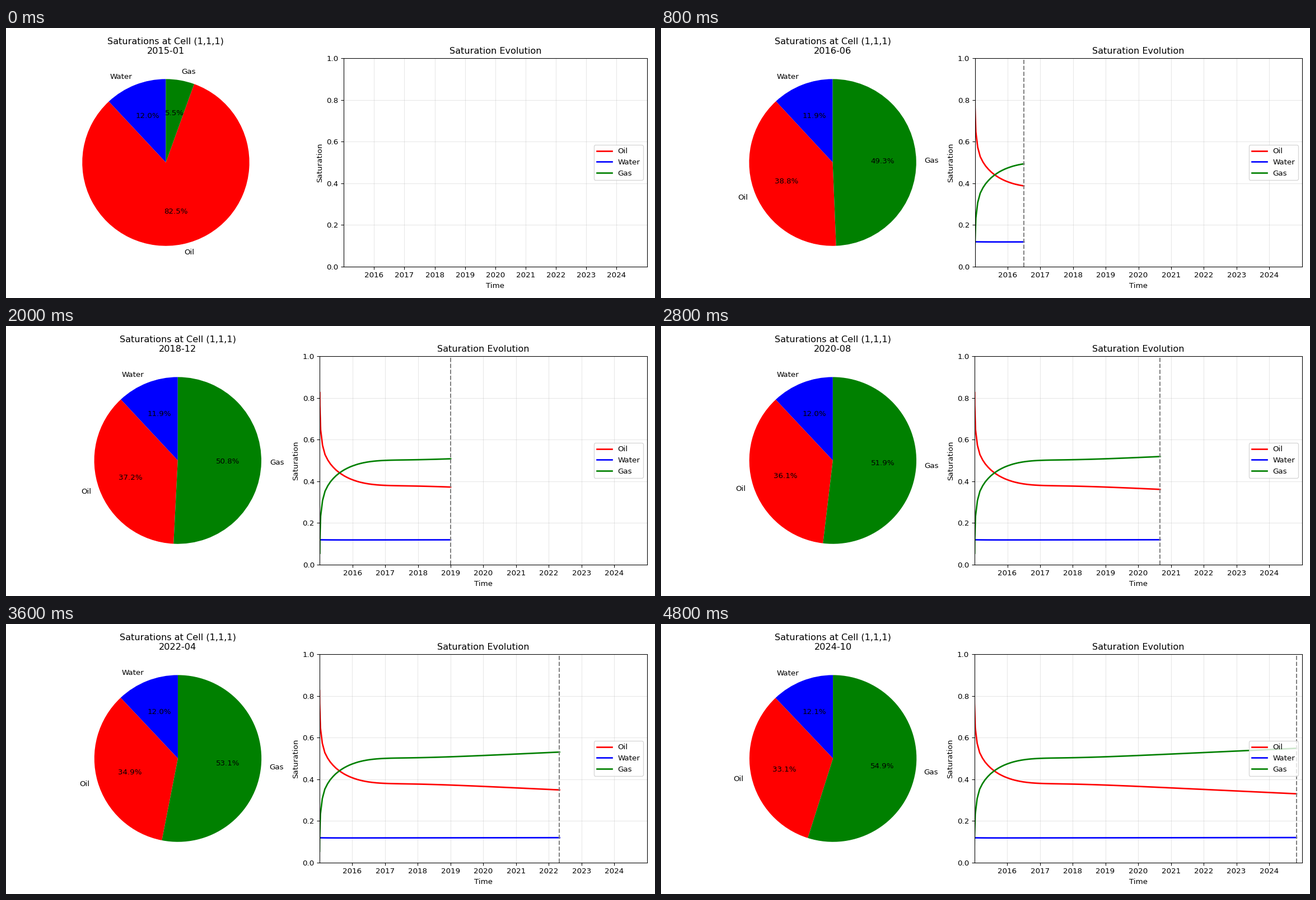
A matplotlib script that plays this animation: 1159x483 px, repeating every 5000 ms.

```python
import numpy as np
import matplotlib.pyplot as plt
from matplotlib.animation import FuncAnimation

W, H = 1159, 483
DPI = W / 12
FRAMES, INTERVAL, STRIDE = 25, 200, 5
LAST_MONTH = 118
TOP, BOTTOM, PIE_LEFT, RIGHT = 54.05, 427.05, 14.6, 1144.6
COLORS = {"Oil": "red", "Water": "blue", "Gas": "green"}
PIE_ORDER = ["Water", "Oil", "Gas"]
START = np.datetime64("2015-01")


def days_at(month):
    """Days from the start to the first of the given month."""
    return ((START + month).astype("M8[D]") - START.astype("M8[D]")).astype(float)


def gas_at(m):
    """A fast and a slow rise to a plateau that later turns into a steady climb."""
    climb = 0.0006 * 8.5 * np.log1p(np.exp((m - 38) / 8.5))
    fast = 0.2622 * np.exp(-2 * m ** 0.6)
    slow = 0.1835 * np.exp(-m / 6.6 - (m / 22) ** 4)
    return 0.5007 + climb - fast - slow


def water_at(m):
    return 0.1186 + 0.000018 * m + 0.001 * np.exp(-m / 4)


# Report steps: two short ones, then one per month
whole = np.arange(1, LAST_MONTH + 1)
months = np.concatenate([[0, 1 / 30, 1 / 3], whole])
days = np.concatenate([[0, 1, 10], days_at(whole)])
gas, water = gas_at(months), water_at(months)
series = {"Oil": 1 - water - gas, "Water": water, "Gas": gas}

fig = plt.figure(figsize=((W + 0.001) / DPI, (H + 0.001) / DPI), dpi=DPI, facecolor="white")
pie_ax = fig.add_axes([0.01, 0.1, 0.4, 0.8])
ax = fig.add_axes([0.5, 0.1, 0.4, 0.8])

lines = {name: ax.plot([], [], color=color, lw=2, label=name)[0]
         for name, color in COLORS.items()}
now = ax.axvline(0, color="gray", ls="--", lw=1.5)
years = range(2016, 2025)
ax.set_xticks([days_at((y - 2015) * 12) for y in years], [str(y) for y in years])
ax.set_xlim(0, 3652.5)
ax.set_ylim(0, 1)
ax.set_xlabel("Time")
ax.set_ylabel("Saturation")
ax.set_title("Saturation Evolution")
ax.grid(True, alpha=0.3)
ax.legend(loc="center right")


def place(axes, left, width):
    axes.set_position([left / W, 1 - BOTTOM / H, width / W, (BOTTOM - TOP) / H])


def date_label(step):
    # Later reports fall just before the month's turn
    month = int(months[step])
    return str(START + (month - (month > 8)))


def update(i):
    step = i * STRIDE

    # The layout settles quickly, then drifts slightly left
    left = 560.8 - 0.05 * i + 42.2 * 0.13 ** i
    width = RIGHT - left
    place(ax, left, width)

    pie_ax.clear()
    place(pie_ax, PIE_LEFT, width)
    pie_ax.pie([series[n][step] for n in PIE_ORDER], labels=PIE_ORDER,
               colors=[COLORS[n] for n in PIE_ORDER], autopct="%1.1f%%", startangle=90)
    pie_ax.set_title(f"Saturations at Cell (1,1,1)\n{date_label(step)}")

    for name, line in lines.items():
        line.set_data(days[:step + 1], series[name][:step + 1])
    now.set_xdata([days[step]] * 2)
    now.set_visible(i > 0)
    return []


anim = FuncAnimation(fig, update, frames=FRAMES, interval=INTERVAL,
                     init_func=lambda: update(0), repeat=True, repeat_delay=0, blit=False)
plt.show()
```
